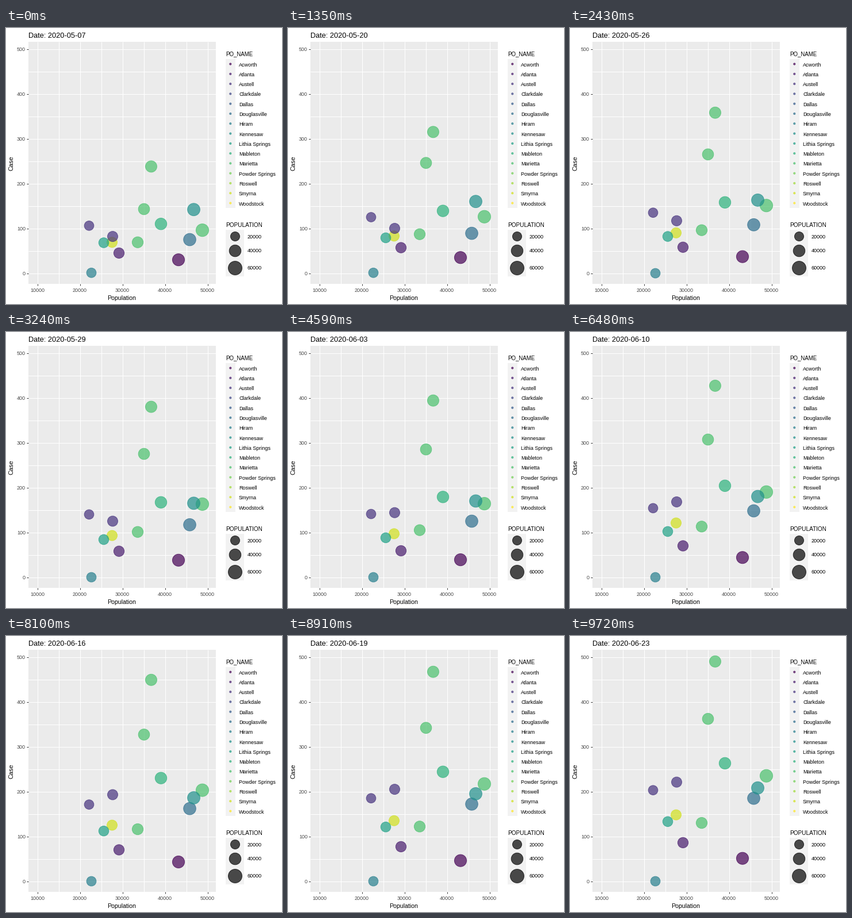
Write a matplotlib script that moves like this. It is 480 by 480 pixels and loops after 9.99 s.

```python
import numpy as np
import matplotlib.pyplot as plt
from matplotlib.animation import FuncAnimation
from matplotlib.patches import Rectangle

plt.rcParams["font.family"] = "Liberation Sans"
plt.rcParams["toolbar"] = "None"

SIZE, DPI = 480, 72          # at 72 dpi one point is one pixel
LEFT, RIGHT, TOP, BOTTOM = 39, 365, 24, 445
GREY30, GREY20 = "#4D4D4D", "#333333"
ALPHA = 0.7

CITIES = ["Acworth", "Atlanta", "Austell", "Clarkdale", "Dallas",
          "Douglasville", "Hiram", "Kennesaw", "Lithia Springs", "Mableton",
          "Marietta", "Powder Springs", "Roswell", "Smyrna", "Woodstock"]
COLORS = dict(zip(CITIES, plt.get_cmap("viridis")(np.linspace(0, 1, len(CITIES)))))

# Days counted from 30 April; a few dates have no report.
DAYS = [7, 10, 13, 15, 18, 20, 21, 22, 23, *range(26, 52), 53, 54]
KEY_DAYS = [7, 20, 29, 34, 41, 47, 54]

# city, population, cases on the key days (in drawing order)
AREAS = [
    ("Marietta", 35135, [143, 246, 275, 285, 307, 327, 362]),
    ("Marietta", 36824, [238, 315, 380, 394, 427, 449, 490]),
    ("Marietta", 33649, [69, 87, 101, 105, 113, 116, 130]),
    ("Marietta", 48850, [96, 126, 163, 164, 190, 203, 235]),
    ("Smyrna", 27635, [69, 83, 93, 97, 121, 125, 148]),
    ("Acworth", 43243, [30, 35, 38, 39, 44, 43, 51]),
    ("Austell", 22230, [106, 125, 140, 141, 154, 171, 203]),
    ("Mableton", 39120, [110, 139, 167, 179, 204, 230, 263]),
    ("Lithia Springs", 25676, [68, 79, 84, 88, 102, 112, 133]),
    ("Douglasville", 45880, [75, 89, 117, 125, 148, 162, 185]),
    ("Hiram", 22770, [1, 1, 0, 0, 0, 0, 0]),
    ("Kennesaw", 46826, [142, 160, 165, 170, 180, 186, 208]),
    ("Austell", 27770, [82, 100, 125, 144, 168, 193, 221]),
    ("Atlanta", 29257, [45, 57, 58, 59, 70, 70, 86]),
]


def px(population):
    return 54 + (population - 10000) * 0.0074


def py(cases):
    return 426.5 - 0.78 * cases


def radius(population):
    return 2.6 + 0.0382 * np.sqrt(population)


fig = plt.figure(figsize=(SIZE / DPI, SIZE / DPI), dpi=DPI, facecolor="white")
ax = fig.add_axes([0, 0, 1, 1])
ax.set_xlim(0, SIZE)
ax.set_ylim(SIZE, 0)
ax.axis("off")


def rect(x0, y0, x1, y1, color):
    ax.add_patch(Rectangle((x0, y0), x1 - x0, y1 - y0, fc=color, lw=0,
                           zorder=1, antialiased=False))


def line(xs, ys, color):
    ax.plot(xs, ys, color=color, lw=1, zorder=2, solid_capstyle="butt")


def label(x, y, text, size, color="black", **kw):
    return ax.text(x, y, text, fontsize=size, color=color,
                   va="baseline", **kw)


def dots(xs, ys, radii, colors, lw=1.0):
    return ax.scatter(xs, ys, s=(2 * np.asarray(radii)) ** 2, c=colors,
                      edgecolors=colors, alpha=ALPHA, linewidths=lw, zorder=3)


# Panel, grid and axes
rect(LEFT, TOP, RIGHT, BOTTOM, "#EBEBEB")
for pop in range(10000, 50001, 5000):
    x = np.floor(px(pop)) + 0.5
    line([x, x], [TOP, BOTTOM], "white")
    if pop % 10000 == 0:
        line([x, x], [BOTTOM, BOTTOM + 3], GREY20)
        label(x, 459, str(pop), 9, GREY30, ha="center")
for cases in range(0, 501, 50):
    y = np.floor(py(cases)) + 0.5
    line([LEFT, RIGHT], [y, y], "white")
    if cases % 100 == 0:
        line([LEFT - 3, LEFT], [y, y], GREY20)
        label(34, y + 3.6, str(cases), 9, GREY30, ha="right")
label(201.5, 473, "Population", 10.5, ha="center")
ax.text(15, 235, "Case", fontsize=11, rotation=90, ha="right",
        va="center")

# Colour legend
KEY = 17.28
label(382, 48, "PO_NAME", 9.8)
rect(382, 54, 399, 313, "#F2F2F2")
rows = 62.6 + KEY * np.arange(len(CITIES))
dots(np.full(len(CITIES), 390.3), rows, np.full(len(CITIES), 1.7),
     list(COLORS.values()), 0.7)
for name, y in zip(CITIES, rows):
    label(405, y + 4, name, 9.05)

# Size legend
label(382, 346, "POPULATION", 9.95)
rect(382, 351, 414, 432, "#F2F2F2")
for pop, y in [(20000, 362), (40000, 386.5), (60000, 416.5)]:
    dots([398], [y], [radius(pop)], ["black"])
    label(420, y + 4, str(pop), 9.05)

# Moving parts
title = label(39, 17, "", 12.75)
pops = np.array([area[1] for area in AREAS])
xs = px(pops)
bubbles = dots(xs, np.zeros(len(xs)), radius(pops),
               [COLORS[area[0]] for area in AREAS])


def draw(i):
    day = DAYS[i]
    month, date = (5, day) if day <= 31 else (6, day - 31)
    title.set_text(f"Date: 2020-{month:02d}-{date:02d}")
    cases = [round(np.interp(day, KEY_DAYS, area[2])) for area in AREAS]
    bubbles.set_offsets(np.column_stack([xs, py(np.array(cases))]))
    return title, bubbles


anim = FuncAnimation(fig, draw, frames=len(DAYS), interval=270,
                     repeat=True, repeat_delay=0, blit=False)
plt.show()
```
